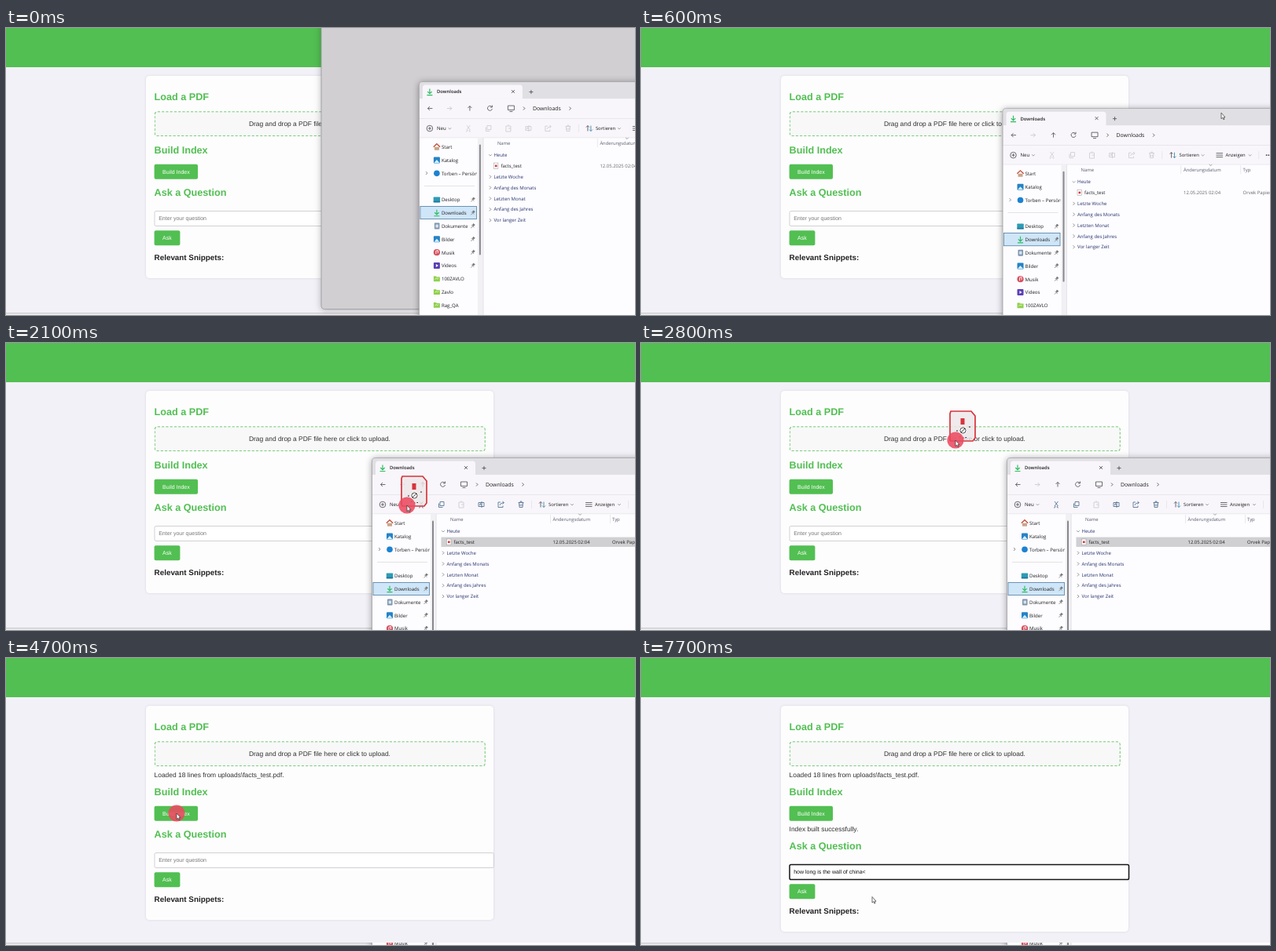
Recreate the animation shown at these times as an HTML page. Size 800x366 px, loop 8 s.

```html
<!DOCTYPE html>
<html lang="en">
<head>
<meta charset="utf-8">
<title>PDF question demo</title>
<style>
html, body { margin: 0; width: 100%; height: 100%; overflow: hidden; background: #f2f1f7; }
svg { display: block; text-rendering: geometricPrecision; }
text { white-space: pre; }
#page text { font-family: "Liberation Sans", Arial, sans-serif; }
#files text { font-family: "Open Sans", "Noto Sans", sans-serif; }
.h { font-size: 12.63px; font-weight: bold; fill: #52bf52; }
.p { font-size: 8.42px; fill: #303030; }
.s { font-size: 7.02px; }
.green { fill: #52bf52; }
.line { fill: none; stroke: #4a4a4e; stroke-width: .8; }
.tool { fill: none; stroke-width: .8; }
.drop { box-sizing: border-box; width: 800px; height: 61px; border: 2px dashed #52bf52; border-radius: 8px; background: #f8f8f9; }
</style>
</head>
<body>
<svg width="800" height="366" viewBox="0 0 800 366">
  <defs>
    <clipPath id="visible"><rect id="visibleBox" width="800" height="366"/></clipPath>
    <clipPath id="sidebar"><rect x="466" y="218" width="73" height="300"/></clipPath>
  </defs>

  <g id="page">
    <rect width="800" height="366" fill="#f2f1f7"/>
    <rect class="green" width="800" height="50"/>
    <rect y="363" width="800" height="3" fill="#eeeef0"/>
    <rect y="363" width="800" height="1.3" fill="#cbcbcf"/>
    <rect id="card" x="178" y="61" width="442" height="258" rx="4.5" fill="#fdfdfe"
      style="filter:drop-shadow(0 .5px 1.5px #0000001c)"/>
    <text class="h" x="188.6" y="92.1">Load a PDF</text>
    <g transform="translate(188.6 106.3) scale(.5265)">
      <foreignObject width="800" height="61"><div class="drop"></div></foreignObject>
    </g>
    <text class="p" x="309" y="125">Drag and drop a PDF file here or click to upload.</text>
    <text class="p" id="loaded" x="188.6" y="151.6">Loaded 18 lines from uploads\facts_test.pdf.</text>
    <g id="build">
      <text class="h" x="188.6" y="160">Build Index</text>
      <rect class="green" x="188.6" y="173.8" width="55.4" height="19" rx="2"/>
      <text class="s" x="199" y="185.7" fill="#fff">Build Index</text>
      <text class="p" id="built" x="188.6" y="205.6">Index built successfully.</text>
    </g>
    <g id="ask">
      <text class="h" x="188.6" y="214.1">Ask a Question</text>
      <rect id="field" x="189" y="233.5" width="431.5" height="19" rx="1.8" fill="#fff"/>
      <text class="s" id="entry" x="194.2" y="245.4"></text>
      <path id="caret" d="M0 239v8" stroke="#000" stroke-width=".8"/>
      <rect class="green" x="188.6" y="258.3" width="32.8" height="19" rx="2"/>
      <text class="s" x="199" y="270.2" fill="#fff">Ask</text>
      <text x="188.6" y="295.8" font-size="9.85" font-weight="bold" fill="#222">Relevant Snippets:</text>
    </g>
  </g>

  <g id="backdrop">
    <path d="M401 -5V354q0 4.500 4.500 4.500H805V-5z" fill="#d1cfd2" stroke="#99989c" stroke-width=".8"
      style="filter:drop-shadow(0 1px 4px #0004)"/>
  </g>

  <g clip-path="url(#visible)"><g id="files"></g></g>

  <g id="ghost">
    <path d="M-6-37h26l5 6v28l-3 4h-28l-1-3v-32z" fill="#eee6e8" fill-opacity=".8" stroke="#d8343c" stroke-width="1.7"/>
    <rect x="6.500" y="-28" width="5" height="8" fill="#d8343c"/>
    <circle cx="9.500" cy="-12.500" r="4.800" fill="#fff"/>
    <g fill="none" stroke="#444" stroke-width="1">
      <circle cx="9.500" cy="-12.500" r="3.600"/><path d="M7-10l5-5"/>
      <path d="M2-13v2M18-18v2M5-4.500h1.500M9-3h1.500M12.500-3.500h1.500" stroke="#222"/>
    </g>
  </g>
  <circle id="press" r="10.6" fill="#ec4a60" fill-opacity=".88"/>
  <path id="arrow" d="M0 0V7.600L1.700 6.100 2.900 8.600 4 8.100 2.900 5.700H5z" fill="#fff" stroke="#333" stroke-width=".7"/>
  <path id="beam" d="M-1.500-4h3M0-4v8M-1.500 4h3" fill="none" stroke="#555" stroke-width=".8"/>
</svg>

<script>
const $ = id => document.getElementById(id);

// Markup helpers; y is the middle of the line
const text = (x, y, str, size = 6, fill = '#1d1d1f', extra = '') =>
  `<text x="${x}" y="${y + size * .36}" font-size="${size}" fill="${fill}" ${extra}>${str}</text>`;
const rect = (x, y, w, h, fill, extra = '') =>
  `<rect x="${x}" y="${y}" width="${w}" height="${h}" fill="${fill}" ${extra}/>`;
const path = (d, extra = 'class="line"') => `<path d="${d}" ${extra}/>`;
const chevron = (x, y, color = '#777') =>
  path(`M${x - 1} ${y - 2}l2 2-2 2`, `fill="none" stroke="${color}" stroke-width=".8"`);
const down = (x, y) => path(`M${x - 1.8} ${y - .8}l1.800 1.800 1.800-1.800`, 'fill="none" stroke="#777" stroke-width=".7"');
const download = (x, y) =>
  path(`M${x} ${y - 4}v6M${x - 2.7} ${y - .5}l2.700 2.700 2.700-2.700M${x - 3.5} ${y + 4}h7`,
    'fill="none" stroke="#2fbd63" stroke-width="1.2"');

const icons = {
  house: (x, y) => path(`M${x - 3} ${y}v4h6v-4z`, 'fill="#c9a58b"') +
    path(`M${x - 4.2} ${y}l4.200-4 4.200 4`, 'fill="none" stroke="#c4533d" stroke-width="1.4"'),
  picture: (x, y) => rect(x - 4, y - 4, 8, 8, '#2583c6', 'rx="1"') +
    path(`M${x - 3.5} ${y + 3.5}l3.500-4 3.500 4z`, 'fill="#d5efff"'),
  dot: (x, y) => `<circle cx="${x}" cy="${y}" r="3.8" fill="#1b82d2"/>`,
  screen: (x, y) => rect(x - 4.2, y - 3.5, 8.4, 7, '#2c9cb5', 'rx=".8"') + rect(x - 4.2, y + 1.8, 8.4, 1.5, '#2473a0'),
  arrow: download,
  doc: (x, y) => rect(x - 3, y - 4, 6.5, 8, '#7d95ae', 'rx=".8"') + rect(x - 1.5, y - 2, 3.5, 4, '#d6e2ee'),
  music: (x, y) => `<circle cx="${x}" cy="${y}" r="4.1" fill="#d5505f"/>` +
    path(`M${x - 1} ${y + 2}v-4l2.500-.5v3.500`, 'fill="none" stroke="#fff" stroke-width=".9"'),
  video: (x, y) => rect(x - 4, y - 4, 8, 8, '#5b3fb5', 'rx="1"') + path(`M${x - 1} ${y - 2}l3 2-3 2z`, 'fill="#fff"'),
  folder: (x, y) => path(`M${x - 4} ${y - 3.300}h3l1 1h4v5.800h-8z`, 'fill="#8fd04c"') +
    path(`M${x - 2.500} ${y + 1}l2-2 1 1.500 2-1.500`, 'fill="none" stroke="#e8f8d4" stroke-width=".8"')
};

// [label, icon, pinned]
const places = [
  ['Start', 'house'], ['Katalog', 'picture'], ['Torben – Persönlich', 'dot'], null,
  ['Desktop', 'screen', 1], ['Downloads', 'arrow', 1], ['Dokumente', 'doc', 1], ['Bilder', 'picture', 1],
  ['Musik', 'music', 1], ['Videos', 'video', 1], ['100ZAVLO', 'folder'], ['Zavlo', 'folder'], ['Rag_QA', 'folder']
];
const groups = ['Letzte Woche', 'Anfang des Monats', 'Letzten Monat', 'Anfang des Jahres', 'Vor langer Zeit'];

function explorer() {
  const frame = 'M465.500 520V151q0-4.500 4.500-4.500H880V520z';
  let s = path(frame, 'fill="#fdfcfe" style="filter:drop-shadow(0 1px 4px #0006)"');
  s += path('M466 194V151q0-4 4-4H880V194z', 'fill="#e0dfe3"');
  s += path('M470 169v-15q0-3.500 3.500-3.500h120q3.500 0 3.500 3.500v15z', 'fill="#f8f6fa"');
  s += rect(466, 168, 414, 50, '#f8f6fa') + rect(466, 193, 414, .7, '#e2e0e5') + rect(466, 217.5, 414, .7, '#e4e3e7');

  // Tab and navigation
  s += download(479, 159.5) + text(488, 159.3, 'Downloads', 5.9, '#1d1d1f', 'font-weight="600"');
  s += path('M583 157l4 4m0-4l-4 4M605.500 159.500h5m-2.500-2.500v5');
  s += path('M482.500 180.500h-6m2.500-2.500l-2.500 2.500 2.500 2.500');
  s += path('M501 180.500h6m-2.500-2.500l2.500 2.500-2.500 2.500', 'class="tool" stroke="#c4c3c8"');
  s += path('M530 183.500v-6m-2.500 2.500l2.500-2.500 2.500 2.500M558 178.500a3 3 0 1 0 .5 2.500M558.500 176.500v2.500h-2.500');
  s += path('M578.500 177h8v5.500h-8zM580.500 184.500h4');
  s += chevron(599, 180.5, '#444') + text(610, 180.5, 'Downloads', 6.9) + chevron(657.5, 180.5, '#444');

  // Commands
  s += '<circle cx="479" cy="206" r="3.8" class="line"/>' + path('M477 206h4m-2-2v4');
  s += text(488, 206, 'Neu', 6.1) + down(504.5, 206);
  const tools = 'M526 202l4.500 6m0-6l-4.500 6m-1 1.500a1 1 0 1 0 1-1.500m4 0a1 1 0 1 0 1 1.500' +
    'M552 202.500h5v5h-5zM550.500 204.500v5h5' +
    'M601 203.500h7v5h-7zM605 202v8M602.500 207l1-2.500 1 2.500' +
    'M629 203h-3v6.500h6v-2M628 207q.500-3 5-3.500m-1.500-1.500l2 1.500-2 2' +
    'M651.500 203.500h7M654 203v-1h2v1M652.500 203.500l.5 6h4l.5-6M654 205.500v2.500M656 205.500v2.500';
  s += path(tools, 'id="tools" class="tool"');
  s += path('M576 203h6v7h-6zM578 202h2M579 206h3', 'class="tool" stroke="#c9c9d0"');
  s += path('M680 209.500v-7m-2 2l2-2 2 2', 'class="line"');
  s += path('M684 202.500v7m-2-2l2 2 2-2', 'class="tool" stroke="#2b7fae"');
  s += text(690, 206, 'Sortieren', 5.9) + down(720, 206);
  s += path('M737 203.500h8.500M737 206h8.500M737 208.500h8.500') + text(749, 206, 'Anzeigen', 5.9) + down(780, 206);
  s += rect(668, 201, .6, 10, '#dedde1') + rect(791, 201, .6, 10, '#dedde1');
  s += [801, 803.5, 806].map(x => `<circle cx="${x}" cy="206" r=".8" fill="#333"/>`).join('');

  // Side list
  s += rect(540, 218.2, 7, 300, '#f1f0f3') + rect(546.8, 218, .7, 300, '#dddce1');
  s += rect(542, 226.5, 2, 141, '#89888c', 'rx="1"');
  s += rect(467, 305.4, 71.5, 16.2, '#cfe6f8', 'stroke="#4f7da2" stroke-width=".8"');
  s += chevron(475, 263) + '<g clip-path="url(#sidebar)">';
  places.forEach((place, i) => {
    const y = 229.7 + i * 16.8;
    if (!place) return s += rect(472, 279, 64, .7, '#d8d7db');
    const [label, icon, pinned] = place;
    s += icons[icon](488, y) + text(494, y + .2, label, 6.1);
    if (pinned) s += path(`M${531.500} ${y + 2.500}l2-2m-1.300-1.700l3 3m-1.800-2.800l1.300-2 1.700 1.700-2 1.300z`,
      'fill="#777" stroke="#777" stroke-width=".8"');
  });
  s += '</g>';

  // File list
  s += down(730, 218.5) + rect(692, 219, .6, 11, '#dddce1') + rect(768, 219, .6, 11, '#dddce1');
  s += text(565, 224.5, 'Name', 5.9, '#5a6070') + text(695.5, 224.5, 'Änderungsdatum', 5.85, '#5a6070') +
    text(771, 224.5, 'Typ', 5.9, '#5a6070');
  s += down(556, 240) + text(560.5, 240, 'Heute', 6, '#26346f');
  s += rect(553.5, 247.6, 330, 12.4, '#d0cfd1', 'id="chosen"');
  s += rect(560.5, 250, 5.5, 7.5, '#fff', 'stroke="#999" stroke-width=".5"') + rect(562, 252.5, 2.6, 2.6, '#d8343c');
  s += text(569.5, 254, 'facts_test', 6);
  s += '<g id="details">' + text(695.5, 254, '12.05.2025 02:04', 5.95, 'inherit') +
    text(771, 254, 'Orvek Papier', 6, 'inherit') + '</g>';
  groups.forEach((label, i) => {
    const y = 267.7 + i * 13.85;
    s += chevron(556, y) + text(560.5, y, label, 6, '#26346f');
  });
  return s + path(frame, 'fill="none" stroke="#a09fa4" stroke-width=".8"');
}
$('files').innerHTML = explorer();

// Keys are [ms, x, y]
const windowKeys = [[0, 60, -78], [600, -5.5, -44], [900, 0, 0]];
const pointerKeys = [
  [0, 804, 75], [600, 738, 108], [900, 738, 158], [1200, 738, 158], [1800, 573, 253], [1880, 573, 253],
  [2100, 510, 207], [2750, 400, 124], [2900, 400, 124], [3450, 451.5, 185], [3700, 451.5, 185],
  [4450, 217, 198], [4950, 217, 198], [5600, 235.5, 277], [6300, 235.5, 277], [6800, 294, 304.5]
];
const presses = [[1850, 2850], [4600, 4850], [5650, 5950]];
const selectAt = 1850, dropAt = 2850, builtAt = 4850, focusAt = 5700, typeAt = 6300, typeTime = 1350;
const question = 'how long is the wall of china<';

function along(keys, t) {
  const i = keys.findIndex(k => k[0] > t);
  if (i < 0) return keys.at(-1).slice(1);
  const [a, b] = [keys[i - 1], keys[i]];
  let f = (t - a[0]) / (b[0] - a[0]);
  if (t > 900) f *= f * (3 - 2 * f);
  return [a[1] + (b[1] - a[1]) * f, a[2] + (b[2] - a[2]) * f];
}
const set = (id, attrs) => { for (const k in attrs) $(id).setAttribute(k, attrs[k]); };
const show = (id, on) => set(id, { display: on ? 'inline' : 'none' });
const move = (id, x, y) => set(id, { transform: `translate(${x} ${y})` });

function draw(t) {
  const loaded = t >= dropAt, built = t >= builtAt, focus = t >= focusAt, selected = t >= selectAt;
  const shift = loaded ? 15 : 0, shiftAsk = shift + (built ? 15 : 0);

  // Web page
  show('loaded', loaded);
  show('built', built);
  move('build', 0, shift);
  move('ask', 0, shiftAsk);
  set('card', { height: 258 + shiftAsk });
  set('field', { stroke: focus ? '#151515' : '#c6c6ca', 'stroke-width': focus ? 1.5 : .8 });
  const count = Math.max(0, Math.min(question.length, Math.ceil((t - typeAt) / typeTime * question.length)));
  $('entry').textContent = count ? question.slice(0, count) : 'Enter your question';
  set('entry', { fill: count ? '#111' : '#777' });
  show('caret', focus && count < question.length);
  move('caret', 194.6 + (count ? $('entry').getComputedTextLength() : 0), 0);

  // File window
  show('backdrop', t < 200);
  move('files', ...along(windowKeys, t));
  set('visibleBox', { y: loaded ? 363 : 0 });
  show('chosen', selected);
  set('details', { fill: selected ? '#222' : '#66666a' });
  set('tools', { stroke: selected ? '#47678a' : '#c9c9d0' });

  // Pointer
  const [x, y] = along(pointerKeys, t);
  const overField = t > 5550 && t < 6400;
  for (const id of ['ghost', 'press', 'arrow', 'beam']) move(id, x, y);
  show('ghost', t >= 1920 && t < dropAt);
  show('press', presses.some(([a, b]) => t >= a && t < b));
  show('arrow', !overField);
  show('beam', overField);
}

const start = performance.now();
(function tick() {
  draw((performance.now() - start) % 8000);
  requestAnimationFrame(tick);
})();
</script>
</body>
</html>
```
